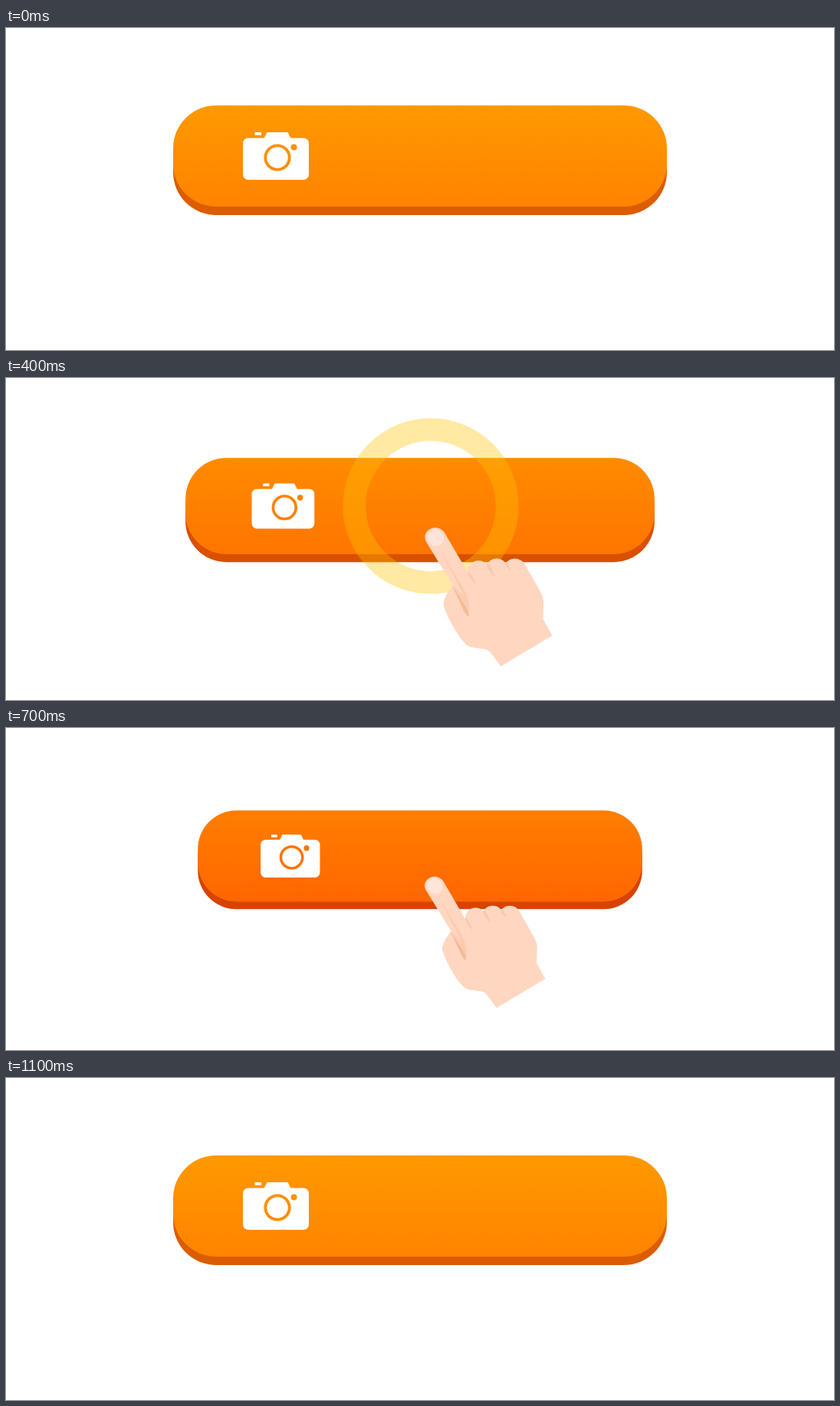
Recreate the animation shown at these times as an HTML page. Size 1080 by 420 pixels, loop 1.3 s.

```html
<!DOCTYPE html>
<html lang="en">
<head>
<meta charset="utf-8">
<title>Camera button press</title>
<style>
  html, body { margin: 0; width: 100%; height: 100%; overflow: hidden; background: #fff; }
  svg { display: block; width: 100%; height: 100%; }
</style>
</head>
<body>
<svg viewBox="0 0 1080 420">
  <defs>
    <linearGradient id="face" gradientUnits="userSpaceOnUse" x1="0" y1="101" x2="0" y2="233">
      <stop id="top"/>
      <stop id="bottom" offset="1"/>
    </linearGradient>
  </defs>

  <g class="pressed">
    <rect id="edge" x="218" y="112" width="644" height="132" rx="56"/>
    <rect x="218" y="101" width="644" height="132" rx="56" fill="url(#face)"/>
    <g fill="#fff">
      <rect x="309" y="143.5" width="86" height="54.5" rx="7"/>
      <path d="M336 145L340.5 136H367.500L372 145Z"/>
      <rect x="324.500" y="136" width="8.500" height="3.800"/>
    </g>
    <circle cx="354" cy="169" r="15.700" fill="none" stroke="url(#face)" stroke-width="3.800"/>
    <circle cx="375.500" cy="155.500" r="4" fill="url(#face)"/>
  </g>

  <circle id="ring" cx="554" cy="167" fill="none" stroke="#ffc200"/>

  <g id="hand" class="pressed">
    <path fill="#ffd7c0" d="M549 217C544 209 548 201 555 198C562 195 570 198 574 204L605.500 258
      C605 249 612 242 620 242Q628 242 631.500 247.500Q636 239 645.500 239Q654 239 657.500 246
      Q662 239 670 239Q679 239 684 247L706 286Q710 293 709.700 300L709 322L721.500 345L651 387L635 366
      C628 361 613 363 605 358.500C591 346 576 317 572 302C573 292 579 284 585 276Z"/>
    <path fill="#fbcbb0" d="M566 224L603 286Q609 302 607 314L584 276L600 290Z"/>
    <path fill="#f3bb97" d="M584 276L600 301Q607 310 607 318Q603 319 597 304Z"/>
    <path fill="#f9c9ad" d="M605.500 257Q606 263 617 276Q616 270 608 258Z
      M631 247Q633 255 642 264Q641 257 634 246Z
      M657 246Q658 251 665 256Q664 251 659 244Z"/>
    <ellipse cx="561.500" cy="210.500" rx="10.800" ry="11.800" transform="rotate(-30 561.500 210.500)" fill="#ffe5d9"/>
  </g>
</svg>
<script>
  const STEP = 100, STEPS = 13, PEAK = 6;
  const byId = id => document.getElementById(id);
  const set = (id, attrs) => {
    for (const name in attrs) byId(id).setAttribute(name, attrs[name]);
  };
  const clamp = v => Math.max(0, Math.min(1, v));
  const pressedGroups = document.querySelectorAll('.pressed');

  function draw(time) {
    const step = Math.floor(time / STEP) % STEPS;
    const distance = Math.abs(step - PEAK);
    const press = Math.max(0, 3 - distance);

    const scale = 1 - 0.05 * press;
    for (const group of pressedGroups) {
      group.setAttribute('transform', `translate(540 167) scale(${scale}) translate(-540 -167)`);
    }
    set('top', { 'stop-color': `rgb(255 ${153 - 13.7 * press} 0)` });
    set('bottom', { 'stop-color': `rgb(255 ${131 - 14.3 * press} 0)` });
    set('edge', { fill: `rgb(${219 - 2 * press} ${93 - 13 * press} 0)` });

    // The ring closes in on the button and vanishes right after the press.
    const radius = 144 - 14.7 * (step - 2);
    const width = Math.max(0, 0.259 * radius);
    set('ring', {
      r: Math.max(0, radius - width / 2),
      'stroke-width': width,
      opacity: step >= 2 && step <= PEAK ? 0.12 * (step - 1) : 0
    });
    set('hand', { opacity: clamp((5 - distance) / 2) });
  }

  const start = performance.now();
  function tick() {
    draw(performance.now() - start);
    requestAnimationFrame(tick);
  }
  tick();
</script>
</body>
</html>
```
